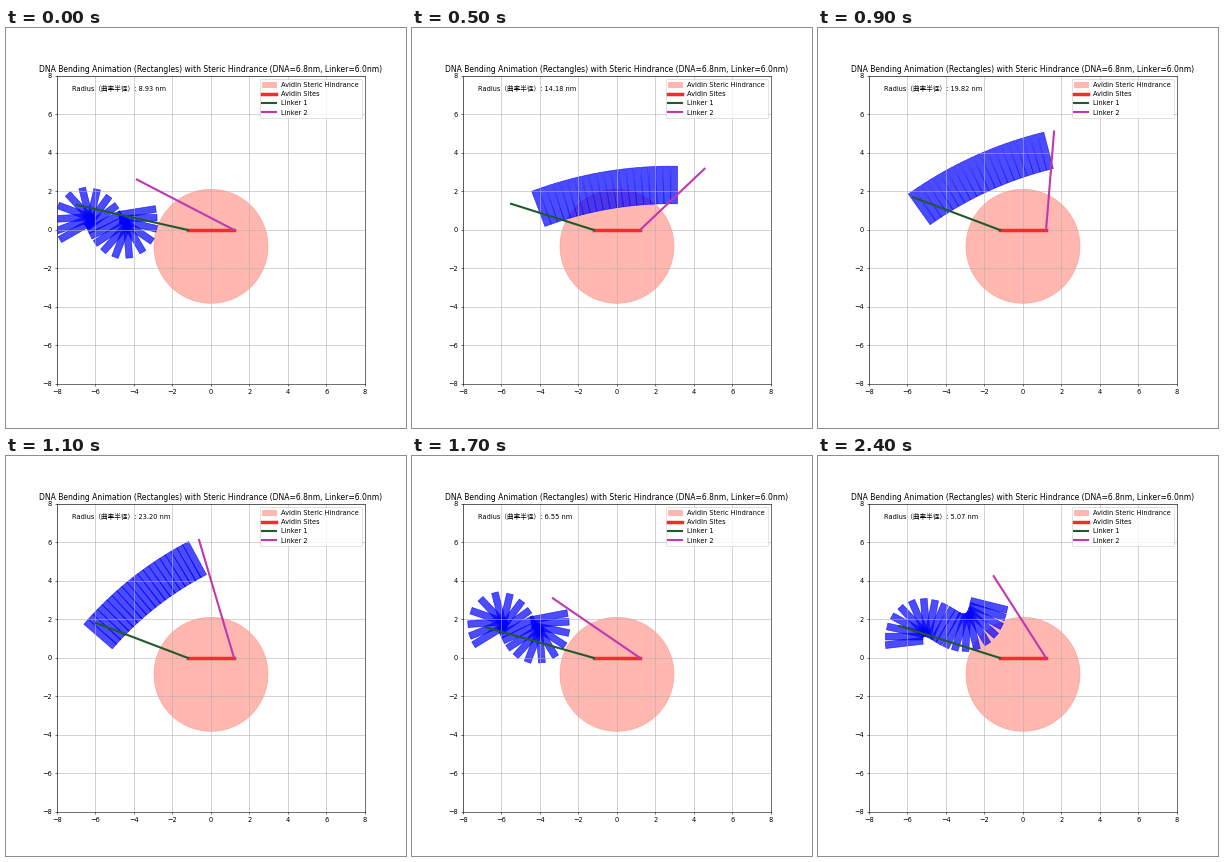
A matplotlib script for the animation above (2.5 s loop, 400 px wide and 400 px high).

```python
import numpy as np
import matplotlib.pyplot as plt
from matplotlib.animation import FuncAnimation
from matplotlib.collections import PolyCollection
from matplotlib.patches import Circle

plt.rcParams["font.family"] = ["DejaVu Sans", "Noto Sans CJK JP"]
plt.rcParams["font.size"] = 9.5

FRAMES = 25
N_RECT = 20
RECT_LEN, RECT_W = 1.95, 0.35
DNA_LEN = 6.6
BOW = 0.38
SITE = 1.2

# Step, radius, linker 1 tip x y, linker 2 tip x y, strand span, strand sag
KEYS = np.array([
    (0, 8.93, -6.98, 1.30, -3.85, 2.62, 3.1, 1.5),
    (3, 11.90, -5.58, 1.15, 5.25, 2.26, 6.5, 0.3),
    (7, 16.45, -5.42, 1.57, 3.85, 4.10, 8.3, 0.75),
    (11, 23.20, -5.98, 1.82, -0.62, 6.13, 6.6, 0.8),
    (14, 0.95, -7.08, 1.62, -4.48, 2.22, 1.5, 0.0),
    (20, 12.15, -6.55, 1.56, -2.18, 3.98, 4.5, 1.35),
    (24, 5.07, -6.42, 1.66, -1.52, 4.25, 5.0, 1.2),
]).T


def state(i):
    """Radius, linker tips, span and sag at step i."""
    return [np.interp(i, KEYS[0], row) for row in KEYS[1:]]


def strand(x1, y1, x2, y2, span, sag):
    """Centres and headings of a chain that buckles when squeezed."""
    u = (np.arange(N_RECT) + 0.5) / N_RECT
    length = max(span, DNA_LEN)
    curl = 2.1 * np.sqrt(1 - span / length)
    heading = (np.arctan2(y2 - y1, x2 - x1) + BOW * (0.5 - u)
               + curl * np.cos(2 * np.pi * u))
    steps = np.column_stack([np.cos(heading), np.sin(heading)])
    path = np.cumsum(steps, axis=0) * length / N_RECT
    middle = np.array([(x1 + x2) / 2, (y1 + y2) / 2 - sag])
    return path - (path[0] + path[-1]) / 2 + middle, heading


def rectangles(centre, heading):
    c, s = np.cos(heading), np.sin(heading)
    across = np.column_stack([c, s]) * RECT_W / 2
    along = np.column_stack([-s, c]) * RECT_LEN / 2
    return np.stack([centre - along - across, centre + along - across,
                     centre + along + across, centre - along + across], axis=1)


fig, ax = plt.subplots(figsize=(8, 8), dpi=50)
# Keeps the grid lines off exact half pixels
fig.subplots_adjust(left=0.1249, right=0.8999, bottom=0.1101, top=0.8801)
ax.set(xlim=(-8, 8), ylim=(-8, 8), aspect="equal",
       xticks=range(-8, 9, 2), yticks=range(-8, 9, 2))
ax.grid(True)
ax.set_title("DNA Bending Animation (Rectangles) with Steric Hindrance "
             "(DNA=6.8nm, Linker=6.0nm)", fontsize=11)

ax.add_patch(Circle((0, -0.85), 2.96, color="#ff7163", alpha=0.5,
                    label="Avidin Steric Hindrance"))
dna = PolyCollection([], facecolor="blue", edgecolor="blue", linewidth=1,
                     alpha=0.7, zorder=1.2)
ax.add_collection(dna, autolim=False)
ax.plot([-SITE, SITE], [0, 0], color="#ee3029", lw=5, label="Avidin Sites")
link1, = ax.plot([], [], color="#1f5a2c", lw=3, label="Linker 1")
link2, = ax.plot([], [], color="#c236b2", lw=3, label="Linker 2")
ax.legend(loc="upper right", handlelength=2.1)
label = ax.text(0.05, 0.95, "", transform=ax.transAxes)


def update(i):
    radius, x1, y1, x2, y2, span, sag = state(i)
    dna.set_verts(rectangles(*strand(x1, y1, x2, y2, span, sag)))
    link1.set_data([-SITE, x1], [0, y1])
    link2.set_data([SITE, x2], [0, y2])
    label.set_text(f"Radius（曲率半径）: {radius:.2f} nm")
    return dna, link1, link2, label


anim = FuncAnimation(fig, update, frames=FRAMES, interval=100, repeat=True,
                     repeat_delay=0)
plt.show()
```
